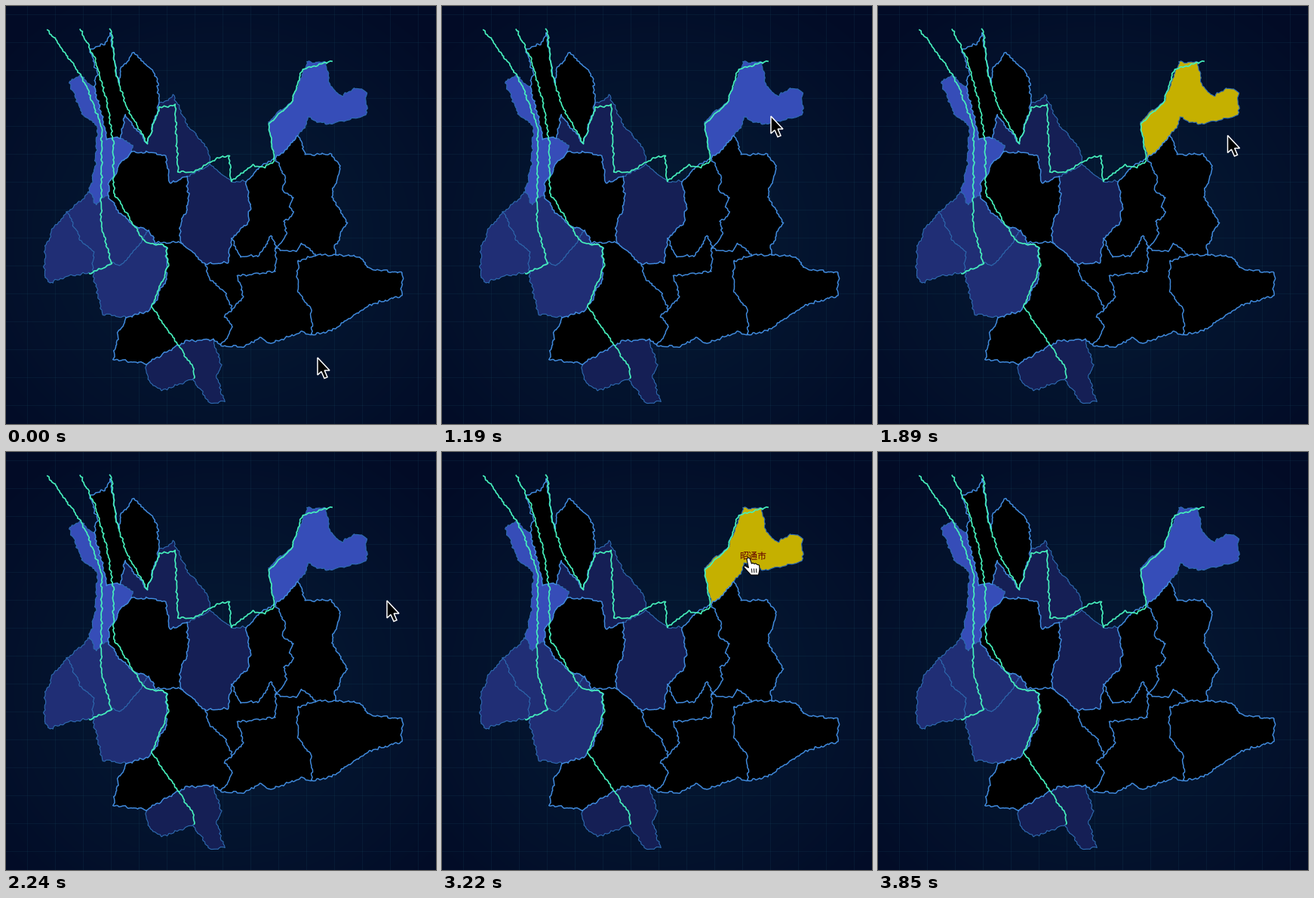
These frames come from a looping animation (570x554 px, 4.41 s). A matplotlib script:

```python
import numpy as np
import matplotlib.pyplot as plt
from matplotlib.animation import FuncAnimation
from matplotlib.patches import Polygon

W, H, DPI = 570, 554, 100
STEP, FRAMES = 70, 63
PX = 72 / DPI

BLACK, BRIGHT, MID, DARK = "#000000", "#364db8", "#202e75", "#151f55"
EDGE, SOFT_EDGE, RIVER, YELLOW = "#408adc", "#2e6cb2", "#46f0bc", "#c5b000"

# Points where borders meet
NODES = dict(
    a=(117, 108), b=(152, 174), c=(166, 194), d=(135, 250), e=(110, 246),
    f=(203, 131), g=(240, 226), h=(271, 211), i=(190, 297), j=(198, 314),
    k=(232, 313), l=(82, 274), m=(115, 353), n=(160, 413), o=(185, 474),
    p=(274, 442), q=(264, 342), r=(300, 402), s=(284, 450), t=(299, 309),
    u=(318, 232), v=(357, 202), w=(358, 322), x=(412, 330), y=(437, 330),
    z=(406, 436), A=(388, 172), B=(289, 524), C=(399, 74), D=(58, 367))

# Bends of the borders between two nodes: x, y, x, y, ...
COAST = dict(
    ea=(118, 214, 121, 160, 101, 143, 83, 100, 97, 92),
    af=(121, 88, 111, 58, 131, 50, 138, 37, 149, 102, 154, 80, 170, 61, 200, 94),
    fh=(222, 119, 240, 157, 268, 190),
    hu=(299, 233),
    uv=(336, 214),
    vC=(347, 154, 379, 126, 393, 90),
    CA=(424, 75, 430, 107, 445, 120, 462, 109, 477, 112, 478, 145, 450, 152,
        424, 157, 402, 148),
    Ay=(397, 197, 430, 196, 444, 214, 431, 252, 452, 286, 436, 318),
    yz=(470, 332, 480, 348, 526, 354, 524, 384, 482, 396, 432, 430),
    zs=(392, 432, 352, 447, 336, 440, 314, 452),
    pB=(286, 476, 279, 490),
    Bo=(270, 527, 248, 494, 206, 510, 188, 495),
    on=(142, 468, 150, 430),
    nm=(128, 408),
    mD=(82, 358),
    Dl=(51, 357, 52, 320, 64, 292))
INLAND = dict(
    ab=(127, 145, 134, 176), bc=(168, 186), cd=(150, 212, 137, 236),
    de=(120, 263), bf=(158, 144, 187, 182), cg=(196, 194, 212, 200, 217, 235),
    di=(152, 276, 176, 294), gk=(242, 262, 230, 294), ml=(116, 324, 102, 315),
    mi=(142, 340, 152, 344, 172, 322), jn=(213, 320, 213, 360, 192, 403),
    qt=(294, 340), tu=(320, 288, 324, 268), qr=(270, 362, 290, 378),
    rs=(290, 412, 301, 426), op=(212, 459, 240, 444),
    tw=(310, 332, 335, 331, 352, 304),
    vw=(370, 228, 367, 246, 381, 254, 376, 266, 382, 276, 368, 286, 372, 302),
    wr=(357, 352, 307, 358, 315, 384), Av=(374, 186), wx=(384, 326, 392, 314),
    xz=(388, 338, 386, 356, 388, 380, 404, 402))
BENDS = {**COAST, **INLAND}

# Each region is a closed walk over the nodes.
REGIONS = {
    BLACK: "afba cgkjidc sponjkqrs uvwtu twrqt AyxwvA yzxy zsrwxz",
    DARK: "fhgcbf hutqkgh pBop",
    MID: "lediml mDlm nmijn",
    BRIGHT: "eabcde vCAv",
}

RIVERS = [
    (55, 31, 90, 78, 106, 105, 127, 160, 126, 290, 140, 342, 111, 354),
    (98, 31, 118, 70, 134, 128, 142, 180, 143, 248, 184, 313, 212, 318, 215, 346,
     193, 398, 249, 480, 249, 493),
    (139, 31, 146, 90, 160, 134, 187, 182, 203, 135, 224, 131, 228, 220, 250, 220,
     279, 202, 296, 198, 298, 232, 328, 211, 343, 214, 356, 205, 348, 157, 378, 128,
     393, 84, 431, 73),
]


def rgb(color):
    return np.array(plt.matplotlib.colors.to_rgb(color))


def rough(points, amount=1.0):
    """Refine a polyline and shake it by a field that depends on place only."""
    p = np.reshape(points, (-1, 2)).astype(float)
    s = np.r_[0, np.cumsum(np.hypot(*np.diff(p, axis=0).T))]
    at = np.union1d(s, np.arange(0, s[-1], 2.2))
    x, y = np.interp(at, s, p[:, 0]), np.interp(at, s, p[:, 1])
    dx = (np.sin(0.83 * x + 0.71 * y) + 0.6 * np.sin(0.47 * x - 0.95 * y)
          + np.sin(0.31 * y + 0.1 * x))
    dy = (np.sin(0.68 * x - 0.77 * y + 2) + 0.6 * np.sin(0.97 * x + 0.39 * y)
          + np.sin(0.33 * x - 0.1 * y))
    return np.c_[x + 0.75 * amount * dx, y + 0.75 * amount * dy]


def border(start, end):
    if end + start in BENDS:
        return border(end, start)[::-1]
    return rough((*NODES[start], *BENDS.get(start + end, ()), *NODES[end]))


fig = plt.figure(figsize=(W / DPI, H / DPI), dpi=DPI)
ax = fig.add_axes([0, 0, 1, 1])
ax.axis("off")

yy, xx = np.mgrid[0:H, 0:W]
fade = np.clip(np.hypot((xx - 285) / 400, (yy - 310) / 380), 0, 1)[..., None] ** 1.5
ax.imshow(rgb("#051933") * (1 - fade) + rgb("#020b26") * fade,
          extent=(0, W, H, 0), aspect="auto")
ax.set_xlim(0, W)
ax.set_ylim(H, 0)
for k in range(16):
    grid = dict(color="#184a64", alpha=0.2, lw=PX)
    ax.axvline(27.5 + 37 * k, **grid)
    ax.axhline(10.5 + 37 * k, **grid)

bold = set()
edges = {}
for color, walks in REGIONS.items():
    for walk in walks.split():
        parts = [border(*pair) for pair in zip(walk, walk[1:])]
        region = ax.add_patch(Polygon(np.vstack(parts), fc=color, ec="none", zorder=2))
        for pair, pts in zip(zip(walk, walk[1:]), parts):
            key = frozenset(pair)
            edges[key] = pts
            if color == BLACK:
                bold.add(key)
hovered = region

for key, pts in edges.items():
    strong = key in bold
    ax.plot(*pts.T, color=EDGE if strong else SOFT_EDGE,
            lw=(1.5 if strong else 1.1) * PX, zorder=4 if strong else 3)
for points in RIVERS:
    ax.plot(*rough(points, 0.8).T, color=RIVER, lw=1.7 * PX, zorder=5)

label = ax.text(412.5, 136.5, "昭通市", family="Noto Sans CJK JP", size=12 * PX,
                color="#640000", ha="center", va="center_baseline", zorder=6)

ARROW = np.array([(0, 0), (0, 23), (5, 18.5), (9, 27.5), (13, 25.8), (9.2, 17),
                  (16, 17)])
HAND = np.array([(-2, 1), (-0.5, -1), (2, 0), (4.4, 7), (6, 6), (8, 7.4),
                 (9.6, 6.6), (11.4, 8), (14.6, 9), (15, 15), (13.5, 22), (3.5, 22),
                 (-6, 11.5), (-5, 9.5), (0.4, 12.5)])
CREASES = [np.array([(x, 14), (x + 0.4, 18.5)]) for x in (4.5, 7.5, 10.5)]

arrow = ax.add_patch(Polygon(ARROW, fc="black", ec="white", lw=1.5 * PX, zorder=8))
hand = ax.add_patch(Polygon(HAND, fc="white", ec="black", lw=1.1 * PX, zorder=8))
creases = [ax.plot(*c.T, color="black", lw=PX, zorder=9)[0] for c in CREASES]

# time, x, y of the pointer
PATH = np.array([
    (0, 413, 466), (210, 440, 440), (560, 491, 325), (910, 524, 185),
    (1050, 524, 185), (1190, 436, 146), (1330, 414, 143), (1750, 414, 143),
    (2030, 513, 200), (2240, 505, 197), (2450, 455, 160), (2660, 406, 141),
    (3290, 406, 141), (3500, 482, 187), (3640, 520, 205)])
HOVERS = [(1190, 1890), (2520, 3500)]
FADE, POINTER_GONE = 300, 3780


def ease_out(u):
    return 1 - (1 - np.clip(u, 0, 1)) ** 3


def update(frame):
    t = frame * STEP
    inside = any(a < t < b for a, b in HOVERS)
    glow = max(ease_out((t - a) / FADE) - ease_out((t - b) / FADE)
               for a, b in HOVERS)
    hovered.set_facecolor(rgb(BRIGHT) * (1 - glow) + rgb(YELLOW) * glow)
    label.set_visible(inside)

    tip = np.array([np.interp(t, PATH[:, 0], PATH[:, i]) for i in (1, 2)])
    shown = t < POINTER_GONE
    arrow.set_xy(ARROW + tip)
    arrow.set_visible(shown and not inside)
    hand.set_xy(HAND + tip)
    hand.set_visible(shown and inside)
    for line, crease in zip(creases, CREASES):
        line.set_data(*(crease + tip).T)
        line.set_visible(shown and inside)
    return [hovered, label, arrow, hand, *creases]


anim = FuncAnimation(fig, update, frames=FRAMES, interval=STEP, repeat=True,
                     repeat_delay=0, blit=False)
plt.show()
```
